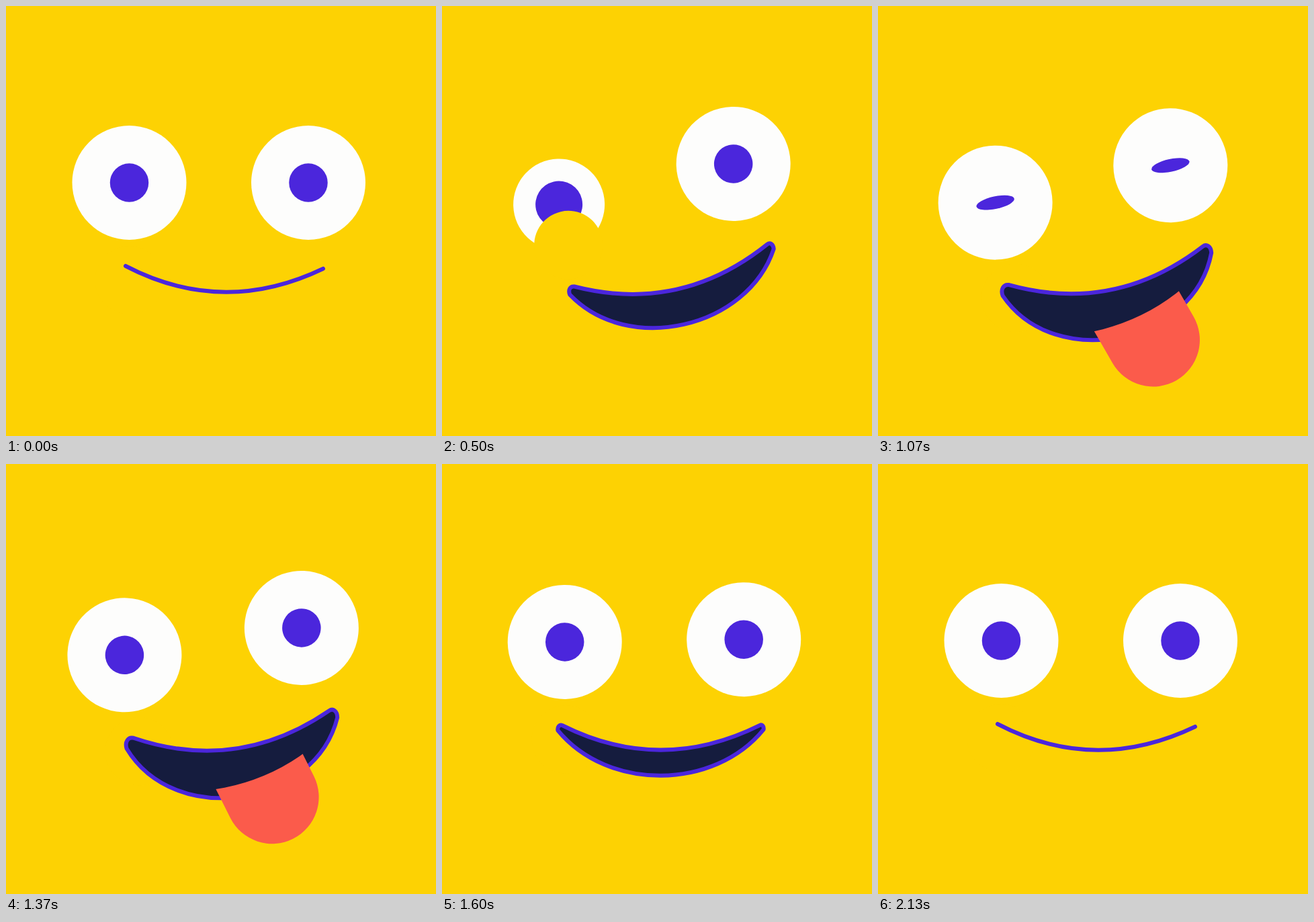
Recreate the animation shown at these times as an HTML page. Size 640 by 640 pixels, loop 2160 ms.

```html
<!DOCTYPE html>
<html lang="en">
<head>
<meta charset="utf-8">
<title>Silly face</title>
<style>
  :root { --skin: #fdd203; --ink: #4b26dc; --white: #fdfdfc; }
  html, body { margin: 0; width: 100%; height: 100%; overflow: hidden; background: var(--skin); }
  svg { display: block; width: 100%; height: 100%; }
  .white { fill: var(--white); }
  .pupil { fill: var(--ink); }
  #cheek { fill: var(--skin); }
  #mouth { fill: #151c3e; stroke: var(--ink); stroke-width: 6; stroke-linecap: round; stroke-linejoin: round; }
  #tongue { stroke: #fb5b4b; stroke-width: 139; stroke-linecap: round; }
</style>
</head>
<body>
<svg viewBox="0 0 640 640">
  <defs>
    <clipPath id="lip"><path d="M-80 157A300 300 0 0 0 150 99.5V420H-80Z"/></clipPath>
  </defs>
  <g id="face">
    <g transform="translate(-136.5 -57)">
      <circle id="winkEye" class="white" r="85"/>
      <ellipse id="leftPupil" class="pupil"/>
      <circle id="cheek" r="51"/>
    </g>
    <g transform="translate(130 -57)">
      <circle class="white" r="85"/>
      <ellipse id="rightPupil" class="pupil"/>
    </g>
    <path id="mouth"/>
    <g clip-path="url(#lip)">
      <line id="tongue" x1="4.4" y1="49"/>
    </g>
  </g>
</svg>
<script>
const LOOP = 2160, FPS = 30, EYE = 85, PUPIL = 28.75;
const set = (id, attrs) => {
  for (const name in attrs) document.getElementById(id).setAttribute(name, attrs[name]);
};

// Easings over a span of animation steps.
const progress = (step, from, to) => Math.min(1, Math.max(0, (step - from) / (to - from)));
const smooth = (...span) => {
  const p = progress(...span);
  return p * p * (3 - 2 * p);
};
const bump = (...span) => Math.sin(Math.PI * progress(...span)) ** 2;
// Swings back first, then past the goal.
const swing = (...span) => {
  const p = progress(...span);
  return smooth(...span) - 0.63 * Math.sin(2 * Math.PI * p) * Math.sin(Math.PI * p);
};

// The lower lip parts from the smile line as the mouth opens.
function mouthPath(open) {
  const at = (x0, y0, x1, y1) => `${x0 + (x1 - x0) * open} ${y0 + (y1 - y0) * open} `;
  const right = (x, y) => at(152, 71, x, y), left = (x, y) => at(-142, 67, x, y);
  return 'M-142 67Q3 142.4 152 71'
    + 'C' + right(158, 68) + right(164, 73) + right(162.5, 83)
    + 'C' + at(52.7, 118.6, 110, 209.5) + at(-45.3, 117.3, -102, 209.5) + left(-154.5, 81)
    + 'C' + left(-156, 71) + left(-150, 64) + '-142 67Z';
}

function draw(time) {
  const step = Math.floor(time % LOOP * FPS / 1000 + 0.15);
  const ease = (curve, from, to) => curve(step, from, to);

  const tilt = 12 * ease(swing, 6.4, 16) - 11.2 * ease(swing, 35, 48)
    - 0.8 * ease(smooth, 48, 60) - 4.6 * ease(bump, 48, 58);
  const squeeze = ease(smooth, 4, 11) - ease(smooth, 17, 26);
  const lift = ease(smooth, 4, 11) - ease(smooth, 19, 27.3);
  const blink = 1 + 0.36 * ease(bump, 22, 30) - 0.79 * ease(bump, 29, 37);
  const open = ease(smooth, 11, 17) - 0.47 * ease(bump, 43, 53) - ease(smooth, 52, 58);
  const out = 116 * (ease(smooth, 16, 24.1) - ease(smooth, 39, 44.8) - 1)
    + 24 * ease(bump, 21, 31) + 50 * ease(bump, 32, 44);

  const leftSize = PUPIL * (1 + 0.217 * squeeze);
  set('face', { transform: `translate(320 320) rotate(${-tilt})` });
  set('winkEye', { r: EYE * (1 - 0.2 * squeeze) });
  set('cheek', { cy: 145 - 83 * lift });
  set('leftPupil', { rx: leftSize, ry: leftSize * blink });
  set('rightPupil', { rx: PUPIL, ry: PUPIL * blink });
  set('mouth', { d: mouthPath(open) });
  set('tongue', { x2: 50.7 + 0.309 * out, y2: 191.7 + 0.951 * out });
}

const start = performance.now();
function tick() {
  draw(performance.now() - start);
  requestAnimationFrame(tick);
}
tick();
</script>
</body>
</html>
```
